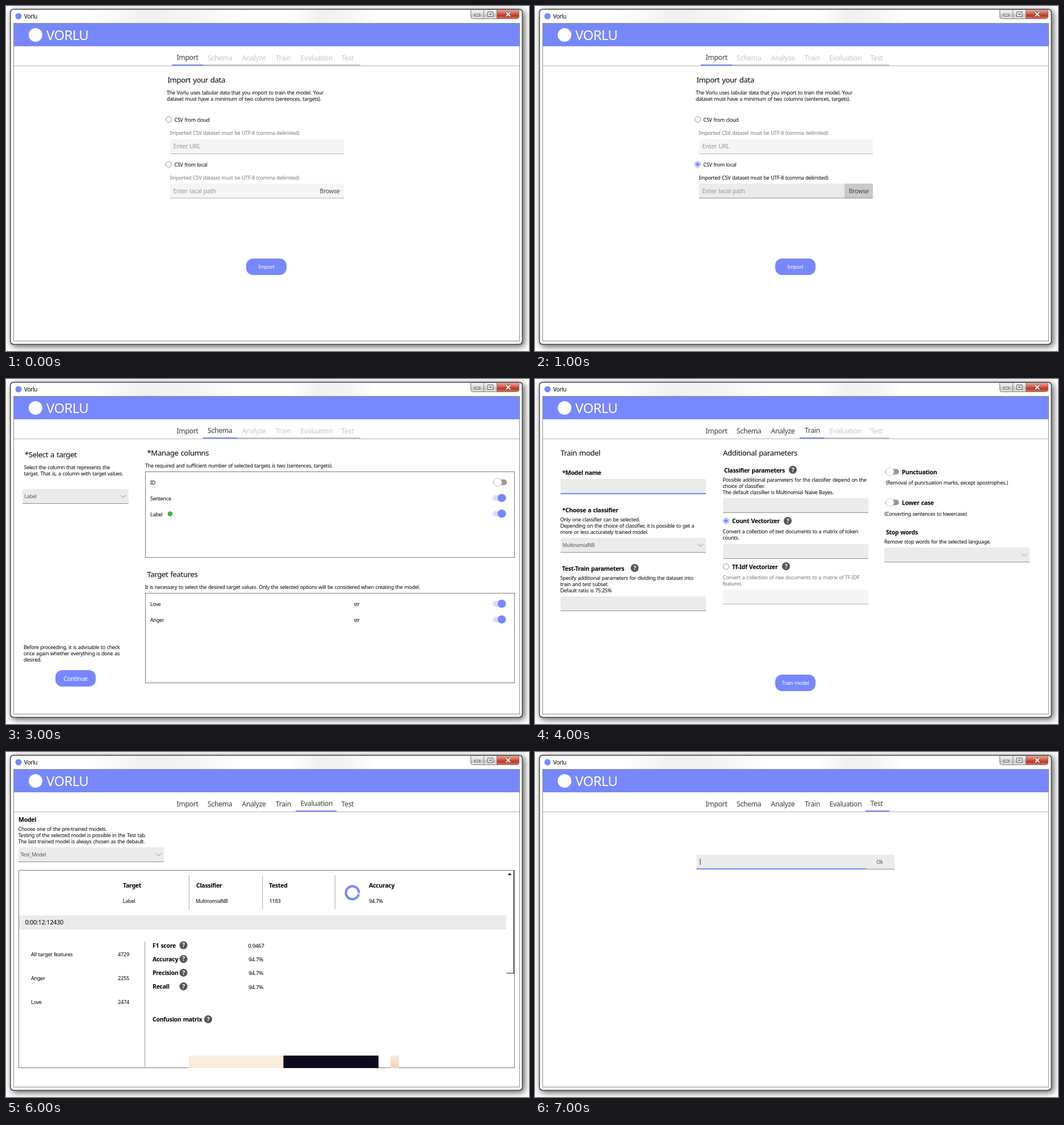
Animation of 921x608 px, one loop 8000 ms. Source, as an HTML page with a canvas:

```html
<!DOCTYPE html>
<html lang="en">
<head>
<meta charset="utf-8">
<title>Vorlu</title>
<style>
html, body { margin: 0; width: 100%; height: 100%; overflow: hidden; background: #fff; }
canvas { display: block; }
</style>
</head>
<body>
<canvas id="stage" width="921" height="608"></canvas>
<script>
const ctx = document.getElementById('stage').getContext('2d');
const BLUE = '#7788ff', BLACK = '#000', GRAY = '#777';
const BODY = 9, LABEL = 10.6, TITLE = 13.2;

function rect(x, y, w, h, color) {
  ctx.fillStyle = color;
  ctx.fillRect(x, y, w, h);
}

function round(x, y, w, h, radii, color) {
  ctx.fillStyle = color;
  ctx.beginPath();
  ctx.roundRect(x, y, w, h, radii);
  ctx.fill();
}

function frame(x, y, w, h, color) {
  ctx.strokeStyle = color;
  ctx.lineWidth = 1;
  ctx.strokeRect(x + .5, y + .5, w - 1, h - 1);
}

function disc(x, y, r, color) {
  ctx.fillStyle = color;
  ctx.beginPath();
  ctx.arc(x, y, r, 0, Math.PI * 2);
  ctx.fill();
}

function ring(x, y, r, width, color, from = 0, to = Math.PI * 2) {
  ctx.strokeStyle = color;
  ctx.lineWidth = width;
  ctx.beginPath();
  ctx.arc(x, y, r, from, to);
  ctx.stroke();
}

function path(points, color, width) {
  ctx.beginPath();
  points.forEach(([x, y]) => ctx.lineTo(x, y));
  if (width) {
    ctx.strokeStyle = color;
    ctx.lineWidth = width;
    ctx.stroke();
  } else {
    ctx.fillStyle = color;
    ctx.fill();
  }
}

function gradient(x0, y0, x1, y1, ...colors) {
  const g = ctx.createLinearGradient(x0, y0, x1, y1);
  colors.forEach((c, i) => g.addColorStop(i / (colors.length - 1), c));
  return g;
}

// y is the middle of the capital letters; the baseline snaps to whole pixels
function text(s, x, y, size = BODY, color = BLACK, weight = 400, align = 'left') {
  ctx.font = `${weight} ${size}px "Noto Sans", sans-serif`;
  ctx.letterSpacing = `${-.03 * size}px`;
  ctx.wordSpacing = `${.07 * size}px`;
  ctx.textAlign = align;
  ctx.fillStyle = color;
  ctx.fillText(s, x, Math.round(y + size * .36));
}

const bold = (s, x, y) => text(s, x, y, LABEL, BLACK, 700);
const title = (s, x, y) => text(s, x, y, TITLE);

function lines(rows, x, y, color = BLACK) {
  rows.forEach((row, i) => text(row, x, y + i * 11, BODY, color));
}

function field(x, y, w, { fill = '#ebebeb', line = '#8c8c8c', thick = 1 } = {}) {
  round(x, y, w, 26, [3, 3, 0, 0], fill);
  rect(x, y + 25, w, thick, line);
}

const FOCUS = { line: BLUE, thick: 2 };
const OFF = { fill: '#f5f5f5', line: '#b0b0b0' };

function combo(x, y, w, value, size = BODY) {
  field(x, y, w);
  text(value, x + 3.5, y + 13, size, '#555');
  const cx = x + w - 9.5, cy = y + 12.5;
  path([[cx - 4.5, cy - 2], [cx, cy + 2.5], [cx + 4.5, cy - 2]], '#888', 1);
}

function radio(x, y, checked) {
  disc(x, y, 5, '#fff');
  ring(x, y, 5, 1, checked ? BLUE : '#8c8c8c');
  if (checked) disc(x, y, 3.3, BLUE);
}

function toggle(x, y, on) {
  round(x, y - 5, 24, 10, 5, on ? '#d9deff' : '#999');
  if (on) return disc(x + 16, y, 7.3, BLUE);
  disc(x + 8, y, 7.2, '#fff');
  ring(x + 8, y, 7.2, .8, '#bbb');
}

function help(x, y) {
  disc(x, y, 7, '#555');
  text('?', x, y, 10.5, '#fff', 700, 'center');
}

function button(x, y, label, size = BODY) {
  round(x, y, 71, 29, 12, BLUE);
  text(label, x + 35.5, y + 15, size, '#fff', 400, 'center');
}

function captionButtons() {
  const glass = gradient(0, 7, 0, 22, '#f4f4f4', '#e2e2e2', '#c4c4c4', '#e4e4e4');
  round(818, 6, 47, 16, [0, 0, 0, 4], glass);
  round(865, 6, 39, 16, [0, 0, 4, 0],
    gradient(0, 7, 0, 22, '#eba393', '#d9705c', '#bd3522', '#d87058'));
  ctx.strokeStyle = '#777';
  ctx.lineWidth = 1;
  ctx.beginPath();
  ctx.roundRect(818.5, 6.5, 85, 16, [0, 0, 4, 4]);
  ctx.stroke();
  rect(841, 7, 1, 15, '#888');
  rect(864, 7, 1, 15, '#777');
  rect(825, 14, 10, 4, '#555');
  rect(826, 15, 8, 2, '#fff');
  rect(848, 10, 10, 9, '#555');
  rect(849, 11, 8, 7, '#fff');
  frame(851, 13, 4, 3, '#555');
  for (const [width, color] of [[4, '#705050'], [2, '#fff']]) {
    path([[881, 11], [888, 18]], color, width);
    path([[888, 11], [881, 18]], color, width);
  }
}

function chrome() {
  rect(0, 0, 921, 608, '#fff');
  ctx.save();
  ctx.shadowColor = 'rgba(0,0,0,.65)';
  ctx.shadowBlur = 12;
  ctx.shadowOffsetX = ctx.shadowOffsetY = 3;
  round(7, 5, 903, 592, 6, '#444');
  ctx.restore();
  round(8.5, 6.5, 900, 589, 5, '#fff');

  // faint glass reflections in the title bar
  for (const [x, w] of [[150, 270], [500, 150]])
    rect(x, 7, w, 23, gradient(x, 7, x + w, 30, '#fff', '#f1f1f1', '#f4f4f4', '#fff'));

  rect(13, 30, 892, 561, '#8c8c8c');
  rect(14, 31, 890, 559, '#fff');
  rect(14, 31, 890, 40, BLUE);
  disc(22, 18, 5.5, BLUE);
  text('Vorlu', 32, 18, 10);
  disc(52, 51, 12, '#fff');
  text('VORLU', 71, 51.5, 24, '#fff');
  captionButtons();
}

const TABS = [
  ['Import', 292, 300.5], ['Schema', 347, 355], ['Analyze', 407, 415.5],
  ['Train', 466, 475], ['Evaluation', 510, 518.5], ['Test', 582, 590.5]
];

function tabs(active, enabled = active) {
  rect(14, 105, 890, 1, '#b4b4b4');
  TABS.forEach(([name, left, x], i) => {
    const width = (TABS[i + 1]?.[1] ?? 624) - left;
    const current = i === active, disabled = i > enabled;
    text(name, x, current ? 90.5 : 91.5, 12.3, disabled ? '#c6c6c6' : '#3c3c3c');
    if (current) rect(left, 103, width, 2, BLUE);
    else if (disabled) rect(left, 103, width, 2, '#c4c4c4');
  });
}

function importPage(local) {
  const hint = 'Imported CSV dataset must be UTF-8 (comma delimited)';
  tabs(0);
  title('Import your data', 284.5, 130);
  lines(['The Vorlu uses tabular data that you import to train the model. Your',
    'dataset must have a minimum of two columns (sentences, targets).'], 283, 153);

  radio(286.5, 200, false);
  text('CSV from cloud', 296.5, 200.5);
  text(hint, 288.5, 224, BODY, GRAY);
  field(289, 235, 306, OFF);
  text('Enter URL', 294.5, 247, 10.8, '#999');

  radio(286.5, 279, local);
  text('CSV from local', 296.5, 279.5);
  text(hint, 288.5, 303, BODY, local ? BLACK : GRAY);
  field(289, 313, 306, local ? {} : OFF);
  if (local) rect(545, 313, 50, 25, '#c9c9c9');
  text('Enter lacal path', 294.5, 326, 10.8, '#999');
  text('Browse', 552.5, 326, 10.8, '#444');

  button(423, 445, 'Import');
}

function schemaPage(chosen) {
  tabs(1);
  title('*Select a target', 33, 133.5);
  lines(['Select the column that represents the',
    'target. That is, a column with target values.'], 31.5, 156);
  combo(29, 194, 187, chosen ? 'Label' : '');
  lines(['Before proceeding, it is advisable to check',
    'once again whether everything is done as', 'desired.'], 31, 473);
  button(87, 513, 'Continue', 10.5);

  title('*Manage columns', 248.5, 130);
  text('The required and sufficient number of selected targets is two (sentences, targets).', 245, 153);
  frame(245, 163, 651, 152, GRAY);
  ['ID', 'Sentence', 'Label'].forEach((name, i) => {
    const y = 182 + i * 27.7;
    text(name, 254, y + 1);
    toggle(i || !chosen ? 857 : 858, y, i > 0 || !chosen);
  });
  if (chosen) disc(289, 237.5, 4.3, '#2fbe3a');

  title('Target features', 248.5, 344);
  text('It is necessary to select the desired target values. Only the selected options will be considered when creating the model.', 244.5, 367);
  frame(245, 377, 651, 159, GRAY);
  if (chosen) ['Love', 'Anger'].forEach((name, i) => {
    const y = 396 + i * 27.7;
    text(name, 254, y + 1);
    text('str', 612.5, y + 1);
    toggle(857, y, true);
  });
}

function trainPage(modelName) {
  tabs(3);
  title('Train model', 45, 130);
  bold('*Model name', 48, 165.5);
  field(45, 176, 256, FOCUS);
  text(modelName, 48.5, 189.5, BODY, '#555');

  bold('*Choose a classifier', 48, 231);
  lines(['Only one classifier can be selected.',
    'Depending on the choice of classifier, it is possible to get a',
    'more or less accurately trained model.'], 44.5, 247.5);
  combo(45, 280, 256, 'MultinomialNB', 8.5);

  bold('Test-Train parameters', 47.5, 334);
  help(175.5, 333);
  lines(['Specify additional parameters for dividing the dataset into',
    'train and test subset.', 'Default ratio is 75:25%'], 44.5, 351);
  field(45, 383, 256);

  title('Additional parameters', 331, 130);
  bold('Classifier parameters', 333, 161);
  help(454, 160);
  lines(['Possible additional parameters for the classifier depend on the',
    'choice of classifier.', 'The default classifier is Multinomial Naive Bayes.'], 330.5, 178);
  field(331, 210, 256);

  radio(336.5, 250, true);
  bold('Count Vectorizer', 347, 250.5);
  help(445, 250);
  lines(['Convert a collection of text documents to a matrix of token', 'counts.'], 330.5, 269);
  field(331, 291, 256);

  radio(336.5, 330.5, false);
  bold('Tf-Idf Vectorizer', 347, 331);
  help(442, 330);
  lines(['Convert a collection of raw documents to a matrix of TF-IDF', 'features.'], 330.5, 350, GRAY);
  field(331, 371, 256, OFF);

  toggle(617, 163.5, false);
  bold('Punctuation', 646, 164);
  text('(Removal of punctuation marks, except apostrophes.)', 618, 183);
  toggle(617, 217.5, false);
  bold('Lower case', 646, 218.5);
  text('(Converting sentences to lowercase)', 615.5, 237.5);
  bold('Stop words', 618, 270.5);
  text('Remove stop words for the selected language.', 615, 287);
  combo(615, 297, 256, '');

  button(423, 521, 'Train model');
}

function evaluationPage() {
  tabs(4, 5);
  bold('Model', 22, 119.5);
  lines(['Choose one of the pre-trained models.',
    'Testing of the selected model is possible in the Test tab.',
    'The last trained model is always chosen as the debault.'], 21.5, 136);
  combo(22, 168, 256, 'Test_Model');

  frame(22, 208, 874, 349, GRAY);
  path([[883.5, 217], [887, 213], [890.5, 217]], '#222');
  rect(893, 209, 2, 182, '#777');
  rect(881, 389, 14, 1.5, '#666');

  [['Target', 206, 'Label', 205.5], ['Classifier', 335, 'MultinomialNB', 334],
    ['Tested', 463, '1183', 463.5], ['Accuracy', 639, '94.7%', 639]
  ].forEach(([head, x, value, vx], i) => {
    bold(head, x, 235.5);
    text(value, vx, 262.5, i === 1 ? 8.5 : 9.3);
  });
  [322, 451, 579].forEach(x => rect(x, 217, 1, 60, '#aaa'));
  ring(610, 248, 11.5, 4, '#c3caff');
  ring(610, 248, 11.5, 4, BLUE, .33, Math.PI * 2);

  rect(23, 288, 858, 25, '#ebebeb');
  text('0:00:12:12430', 33.5, 300.5, 11);

  [['All target features', 4729], ['Anger', 2255], ['Love', 2474]].forEach(([name, count], i) => {
    text(name, 44, 356.5 + i * 42, 9.2);
    text(count, 197, 356.5 + i * 42, 9.3);
  });
  rect(244, 334, 1, 223, '#999');

  [['F1 score', '0.9467'], ['Accuracy', '94.7%'], ['Precision', '94.7%'], ['Recall', '94.7%']]
    .forEach(([name, score], i) => {
      const y = 341 + i * 24.2;
      bold(name, 258, y);
      help(312.5, y - .5);
      text(score, i ? 427 : 426, y + .5, 9.8);
    });
  bold('Confusion matrix', 258, 471.5);
  help(356, 471);
  rect(322, 535, 167, 22, '#faebdd');
  rect(488.5, 535, 167.5, 22, '#0b0a20');
  rect(677, 535, 15, 22, gradient(0, 535, 0, 557, '#faebdd', '#f6cfb2'));
}

function testPage() {
  tabs(5);
  field(284.5, 181, 348.5);
  rect(284.5, 205, 298.5, 2, BLUE);
  rect(290.5, 188, 1, 11, '#222');
  text('Ok', 607, 194, BODY, '#555', 400, 'center');
}

const scenes = [
  () => importPage(false),
  () => importPage(true),
  () => schemaPage(false),
  () => schemaPage(true),
  () => trainPage(''),
  () => trainPage('Test_Model'),
  evaluationPage,
  testPage
];

function draw() {
  const scene = Math.floor(performance.now() / 1000) % scenes.length;
  chrome();
  scenes[scene]();
  requestAnimationFrame(draw);
}
draw();
</script>
</body>
</html>
```
